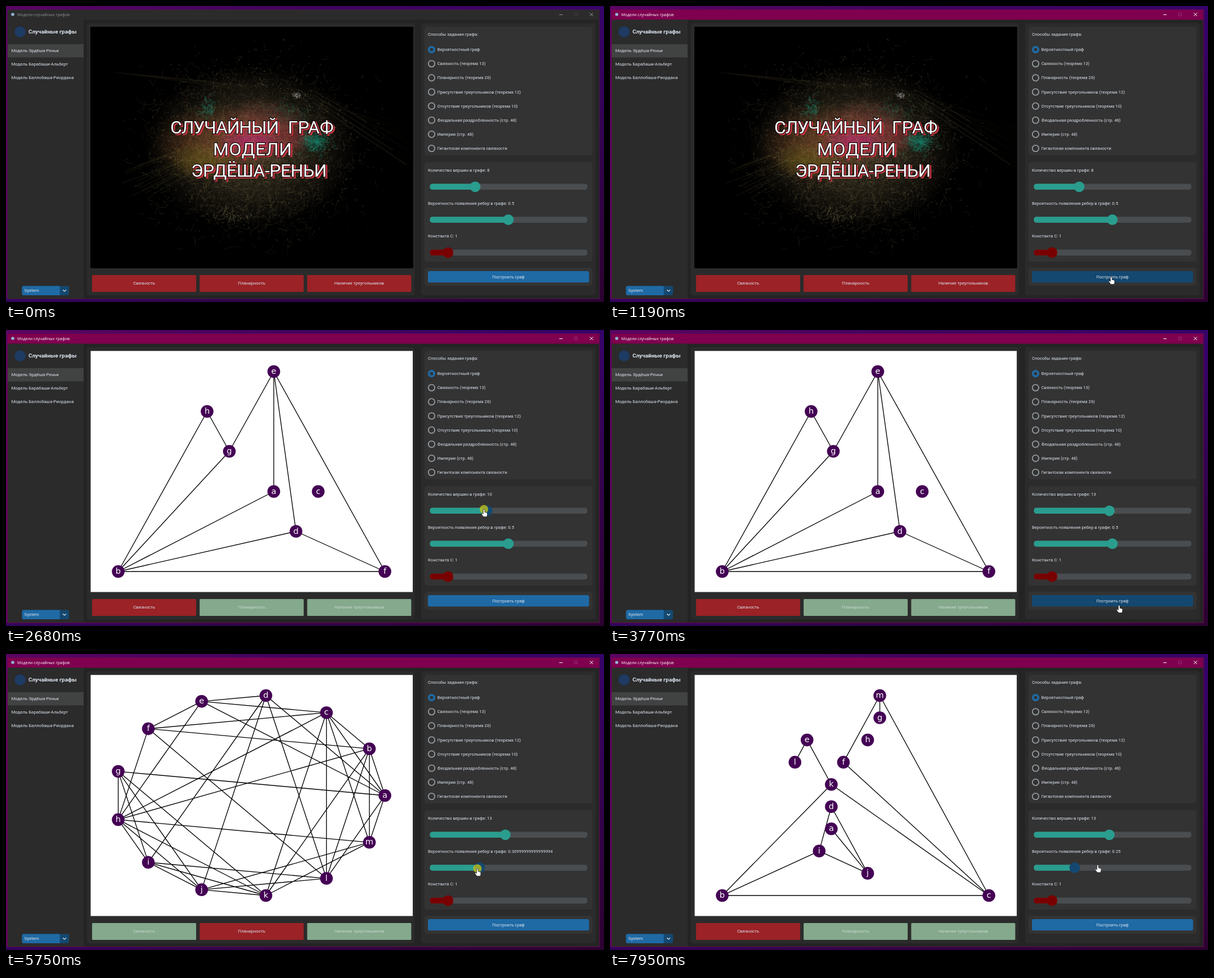
Recreate the animation shown at these times as an HTML page with a canvas. Size 1063 by 527 pixels, loop 8000 ms.

```html
<!DOCTYPE html>
<html lang="ru">
<head>
<meta charset="utf-8">
<title>Модели случайных графов</title>
<style>
html, body { margin: 0; width: 100%; height: 100%; overflow: hidden; background: #2c0552; }
svg, canvas { position: absolute; left: 0; top: 0; display: block; }
#cover { left: 150px; top: 37px; }
text { font: 7.65px Roboto, sans-serif; fill: #dce4ee; white-space: pre; }
.mid { text-anchor: middle; }
.big { font-size: 7.85px; }
.head { font-size: 9.9px; font-weight: 700; }
.cap { font: 7.1px "Open Sans", sans-serif; }
.node { font: 14.6px "DejaVu Sans", sans-serif; fill: #fff; text-anchor: middle; }
.deco text { font: 400 32px Roboto, sans-serif; fill: inherit; }
</style>
</head>
<body>
<svg id="ui" width="1063" height="527"></svg>
<canvas id="cover" width="574" height="430"></canvas>
<svg id="top" width="1063" height="527"></svg>
<script>
const LOOP = 8000;
const $ = id => document.getElementById(id);
const BLUE = '#1f6aa5', HOVER = '#144870', TEAL = '#2a9d8f', RED = '#9b2226', GREEN = '#84a98c';

// ---------- static interface ----------
const rect = (x, y, x2, y2, fill, r = 0, more = '') =>
  `<rect x="${x}" y="${y}" width="${x2 - x}" height="${y2 - y}" rx="${r}" fill="${fill}" ${more}/>`;
const text = (x, y, str, cls = '', more = '') => `<text x="${x}" y="${y}" class="${cls}" ${more}>${str}</text>`;
const circle = (x, y, r, fill, more = '') => `<circle cx="${x}" cy="${y}" r="${r}" fill="${fill}" ${more}/>`;

const slider = (id, y, fill, x) =>
  rect(753.5, y - 5.3, 1033.5, y + 5.3, '#4a4d50', 4.5) +
  rect(753.5, y - 5.3, x, y + 5.3, fill, 4.5, `id="${id}Bar"`) +
  circle(x, y, 9.4, fill, `id="${id}Knob"`);

const modes = ['Вероятностный граф', 'Связность (теорема 13)', 'Планарность (теорема 26)',
  'Присутствие треугольников (теорема 12)', 'Отсутствие треугольников (теорема 10)',
  'Феодальная раздробленность (стр. 48)', 'Империя (стр. 48)', 'Гигантская компонента связности'];
const models = ['Модель Эрдёша-Реньи', 'Модель Барабаши-Альберт', 'Модель Баллобаша-Риордана'];
const checks = ['Связность', 'Планарность', 'Наличие треугольников'];

$('ui').innerHTML = `
  <defs>
    <linearGradient id="desk"><stop stop-color="#5a0464"/><stop offset=".5" stop-color="#40045e"/>
      <stop offset="1" stop-color="#36046a"/></linearGradient>
    <linearGradient id="floor"><stop stop-color="#32055c"/><stop offset="1" stop-color="#2c0230"/></linearGradient>
    <linearGradient id="side" x2="0" y2="1"><stop stop-color="#36046a"/><stop offset="1" stop-color="#2c0230"/></linearGradient>
  </defs>` +
  rect(0, 0, 1063, 527, 'url(#desk)') +
  rect(1055, 0, 1063, 527, 'url(#side)') +
  rect(0, 521, 1063, 527, 'url(#floor)') +
  rect(2.5, 6.5, 1055, 521.5, '#242424', 0, 'id="frame" stroke="#4a1450"') +
  rect(3, 7, 1054.5, 24.5, '#2b2b2b', 0, 'id="bar"') +
  circle(12, 15, 2.8, '#8fb4cf') +
  text(20, 17.8, 'Модели случайных графов', 'cap', 'id="caption"') +
  '<path id="ctl" d="M983.5 15.5h6M1037.8 12.2l5.8 5.8m0-5.8l-5.8 5.8" fill="none" stroke="#999"/>' +
  '<path id="max" d="M1010.5 12.5h5v5h-5z" fill="none" stroke="#444" stroke-width=".8"/>' +
  rect(3, 24.5, 138, 521, '#2b2b2b') +
  circle(25, 46, 9.8, '#1d3b63') +
  text(40, 49.3, 'Случайные графы', 'head') +
  rect(3, 68, 138, 91.5, '#414242') +
  models.map((m, i) => text(9.5, 82 + 24 * i, m, 'big')).join('') +
  rect(28.5, 498.5, 112, 515, HOVER, 3) +
  '<path d="M31.5 498.5H95.5V515H31.5a3 3 0 0 1-3-3v-10.5a3 3 0 0 1 3-3z" fill="#1f6aa5"/>' +
  text(32.5, 509.4, 'System', 'big') +
  '<path d="M101.5 505.8l2.5 2.2 2.5-2.2" fill="none" stroke="#dce4ee" stroke-width="1.3" stroke-linecap="round"/>' +
  rect(144, 30.5, 726.5, 515, '#2b2b2b', 5) +
  checks.map((c, i) => {
    const x = 153 + 191.2 * i;
    return rect(x, 479, x + 185, 509, RED, 1.5, `id="check${i}"`) +
      text(x + 92.5, 496.3, c, 'mid big', `id="checkText${i}"`);
  }).join('') +
  rect(738, 30.5, 1048.5, 515, '#2b2b2b', 5) +
  rect(744, 37, 1042.5, 266, '#333', 5) +
  rect(744, 278, 1042.5, 455, '#333', 5) +
  rect(744, 466, 1042.5, 498, '#333', 5) +
  text(750, 53.2, 'Способы задания графа:') +
  modes.map((m, i) => {
    const y = 77.6 + 25.13 * i;
    return circle(756.5, y, i ? 5.7 : 4.8, 'none', `stroke="${i ? '#949a9f' : BLUE}" stroke-width="${i ? 1.8 : 3.7}"`) +
      text(766.8, y + 2.6, m);
  }).join('') +
  text(750, 295, '', '', 'id="countText"') + slider('count', 321.8, TEAL, 834) +
  text(750, 353.6, '', '', 'id="probText"') + slider('prob', 380.5, TEAL, 893) +
  text(750, 412.2, 'Константа С: 1') + slider('konst', 439, '#780000', 785.8) +
  rect(750, 472, 1036.5, 492.3, BLUE, 3, 'id="build"') +
  text(893.2, 484.8, 'Построить граф', 'mid');

// ---------- graphs ----------
const letters = [...'abcdefghijklm'];
const ring = Object.fromEntries(letters.map((c, i) => {
  const a = 2 * Math.PI * i / 13;
  return [c, [433 + 240.5 * Math.cos(a), 252 - 179.3 * Math.sin(a)]];
}));
const first = { e: [476, 74], h: [357.5, 145], g: [397, 216], a: [476, 287.5], c: [555, 287.5],
  d: [515.5, 358.5], b: [199.5, 430], f: [673.5, 430] };
// column and row of each vertex
const cells = { m: [13, 0], g: [13, 1], e: [7, 2], h: [12, 2], l: [6, 3], f: [10, 3], k: [9, 4],
  d: [9, 5], a: [9, 6], i: [8, 7], j: [12, 8], b: [0, 9], c: [22, 9] };
const last = Object.fromEntries(Object.entries(cells).map(([c, [col, row]]) =>
  [c, [199.5 + 21.545 * col, 74 + 39.55 * row]]));

function graph(id, pos, edges) {
  const lines = edges.split(' ').map(([p, q]) => `M${pos[p]}L${pos[q]}`).join('');
  const nodes = Object.entries(pos).map(([c, [x, y]]) =>
    circle(x, y, 11.3, '#440154') + text(x, y + 4, c, 'node')).join('');
  return `<g id="${id}">${rect(150.5, 37.3, 723, 466.5, '#fff')}
    <path d="${lines}" stroke="#000" stroke-width="1.35" fill="none"/>${nodes}</g>`;
}

const words = text(292, 227, 'СЛУЧАЙНЫЙ', '', 'letter-spacing="-1.2"') + text(501, 227, 'ГРАФ') +
  text(368, 265.5, 'МОДЕЛИ', '', 'letter-spacing=".6"') + text(329, 303.5, 'ЭРДЁША-РЕНЬИ', '', 'letter-spacing="-.5"');

$('top').innerHTML =
  `<g id="words" class="deco">
    <g transform="translate(2.6 2.4)" fill="#c8343f" stroke="#c8343f" stroke-width="2">${words}</g>
    <g fill="#fff" stroke="#140808" stroke-width="2.4" paint-order="stroke">${words}</g></g>` +
  graph('g1', first, 'hb hg ge gb ae ab ed ef db df bf') +
  graph('g2', ring, 'ed ef ec eh ea di dj da dl fc fb fh fl cb ch ca cm cl ck ba bm bl bk bh ' +
    'ag am al gh gi gj gk hm hi hj hk il ik ij jk jl jm km') +
  graph('g3', last, 'mg mf mc fc el ek kb kc di dj aj ij ib bc') +
  circle(0, 0, 7.6, '#c3c41c', 'id="press" opacity=".78"') +
  `<g id="mouse" fill="#fff" stroke="#111" stroke-width=".7" stroke-linejoin="round">
    <path id="hand" d="M-1.4 1Q0-1 1.4 1V5.2L4.6 6Q6.4 6.4 6.2 8.4L5.4 13.5H-.8L-4.4 8.8Q-4.6 6.9-3 7.3L-1.4 8.5Z"/>
    <path id="arrow" d="M0 0V11L2.6 8.6 4.4 12.5 6 11.8 4.3 8H7.8Z"/></g>`;

// ---------- cover picture ----------
(function paintCover() {
  const c = $('cover').getContext('2d');
  let seed = 11;
  const rnd = () => {
    seed = seed + 0x6D2B79F5 | 0;
    let v = Math.imul(seed ^ seed >>> 15, 1 | seed);
    v ^= v + Math.imul(v ^ v >>> 7, 61 | v);
    return ((v ^ v >>> 14) >>> 0) / 4294967296;
  };
  const spread = () => rnd() + rnd() + rnd() - 1.5;
  c.fillStyle = '#000';
  c.fillRect(0, 0, 574, 430);
  c.translate(-150, -37);

  function glow(x, y, rx, ry, rgb, a) {
    c.save();
    c.translate(x, y);
    c.scale(rx, ry);
    const g = c.createRadialGradient(0, 0, 0, 0, 0, 1);
    g.addColorStop(0, `rgba(${rgb},${a})`);
    g.addColorStop(.5, `rgba(${rgb},${a * .6})`);
    g.addColorStop(1, `rgba(${rgb},0)`);
    c.fillStyle = g;
    c.fillRect(-1, -1, 2, 2);
    c.restore();
  }
  function line(x, y, x2, y2, bend, rgb, a, w = .5) {
    c.strokeStyle = `rgba(${rgb},${a})`;
    c.lineWidth = w;
    c.beginPath();
    c.moveTo(x, y);
    c.quadraticCurveTo((x + x2) / 2 + (y - y2) * bend, (y + y2) / 2 + (x2 - x) * bend, x2, y2);
    c.stroke();
  }
  function strands(n, cx, cy, rx, ry, len, rgb, a) {
    for (let i = 0; i < n; i++) {
      const x = cx + spread() * rx, y = cy + spread() * ry;
      const d = Math.atan2(y - cy, x - cx) + 1.57 + spread() * 2;
      const l = len * (.3 + rnd());
      line(x, y, x + Math.cos(d) * l, y + Math.sin(d) * l, spread() * .5, rgb, a * (.4 + rnd()));
    }
  }
  const khaki = '150,140,98';
  glow(435, 250, 190, 145, '105,92,62', .5);
  glow(375, 245, 115, 72, '140,75,38', .45);
  glow(455, 222, 85, 58, '165,70,68', .5);
  glow(350, 275, 60, 32, '110,105,20', .4);
  glow(435, 242, 58, 28, '190,25,115', .65);
  glow(505, 232, 42, 36, '165,42,56', .4);
  glow(550, 240, 26, 20, '15,130,105', .5);

  // long beams
  for (let i = 0; i < 14; i++) {
    line(186 + i * 6, 117 + i * .6, 400 + i * 5, 146 + spread() * 7, 0, '110,104,62', .13);
    line(345, 240 + i * 3.5, 205 + rnd() * 50, 284 + i * 4.5, 0, '115,102,55', .22, .9);
    line(520 + rnd() * 60, 155 + rnd() * 20, 724, 215 + i * 6, 0, '105,98,62', .13, .6);
  }
  for (let i = 0; i < 4; i++) line(545, 150 + i * 7, 640 + i * 24, 205 + i * 26, 0, khaki, .3, .7);

  strands(2400, 437, 252, 165, 125, 13, khaki, .3);
  strands(800, 430, 285, 135, 110, 26, '165,145,98', .17);
  strands(450, 370, 245, 95, 62, 16, '200,112,58', .22);
  strands(350, 455, 225, 85, 62, 16, '205,105,98', .22);
  strands(140, 438, 242, 60, 30, 14, '215,45,145', .35);
  strands(120, 352, 275, 60, 32, 14, '145,138,40', .3);
  strands(150, 550, 241, 26, 24, 11, '25,155,128', .7);
  strands(70, 360, 181, 14, 20, 9, '25,145,118', .75);
  strands(80, 500, 188, 40, 20, 10, '22,125,105', .5);
  strands(60, 398, 372, 34, 12, 12, khaki, .6);
  strands(40, 517, 159, 8, 5, 4, '200,200,200', .8);

  // loose flecks around the core
  for (let i = 0; i < 750; i++) {
    const a = rnd() * 6.283, r = .7 + rnd() * rnd() * .7;
    const x = 440 + Math.cos(a) * 182 * r, y = 248 + Math.sin(a) * 152 * r;
    const d = rnd() * 6.283, l = 1 + rnd() * 3.5;
    line(x, y, x + Math.cos(d) * l, y + Math.sin(d) * l, spread() * .8, khaki, .2 + rnd() * .4, .7);
  }
})();

// ---------- motion ----------
const path = [[130, 942, 548], [480, 906, 359], [910, 891, 482], [1890, 891, 482], [2320, 834, 318],
  [2580, 834, 319], [2860, 888, 319], [3110, 888, 319], [3590, 905, 490], [3770, 905, 490],
  [4080, 899, 482], [4980, 899, 482], [5400, 893, 381], [5470, 893, 382], [5880, 822, 382],
  [6410, 822, 382], [6780, 883, 480], [7420, 883, 480], [7950, 867, 375.5]];
const presses = [[960, 1080], [2470, 2860], [3840, 3960], [5440, 5950], [6800, 6890]];
const flashes = [[1080, 1180], [3960, 4080], [6890, 6970]];

const within = (list, t) => list.some(([a, b]) => t >= a && t < b);

function mouseAt(t) {
  const i = path.findIndex(p => p[0] > t);
  if (i < 0) return path[path.length - 1].slice(1);
  if (!i) return path[0].slice(1);
  const [t0, x0, y0] = path[i - 1], [t1, x1, y1] = path[i];
  const s = (1 - Math.cos(Math.PI * (t - t0) / (t1 - t0))) / 2;
  return [x0 + (x1 - x0) * s, y0 + (y1 - y0) * s];
}
const share = t => (mouseAt(t)[0] - 750) / 287;
const set = (id, attrs) => { for (const k in attrs) $(id).setAttribute(k, attrs[k]); };
const show = (id, on) => { $(id).style.display = on ? '' : 'none'; };

function moveSlider(id, part, hot) {
  const x = 759 + 268 * part;
  set(id + 'Bar', { width: x - 753.5 });
  set(id + 'Knob', { cx: x, fill: hot ? HOVER : TEAL });
}

function draw(t) {
  const [x, y] = mouseAt(t);
  const inside = (top, bottom) => x >= 750 && x <= 1037 && y >= top && y <= bottom;
  const onCount = inside(313, 331), onProb = inside(371, 390), onBuild = inside(472, 492);

  const active = t >= 960;
  set('frame', { stroke: active ? '#6a0650' : '#4a1450' });
  set('bar', { fill: active ? '#7f004f' : '#2b2b2b' });
  set('ctl', { stroke: active ? '#fff' : '#999' });
  set('max', { stroke: active ? '#a03a7a' : '#444' });
  $('caption').style.fill = active ? '#fff' : '#8f8f8f';

  const count = t < 2470 ? 8 : 1 + Math.round(share(Math.min(t, 2860)) * 25);
  const prob = t < 5440 ? .5 : 1 - Math.round((1 - share(Math.min(t, 5950))) / .01) * .01;
  $('countText').textContent = 'Количество вершин в графе: ' + count;
  $('probText').textContent = 'Вероятность появления ребер в графе: ' + prob;
  moveSlider('count', (count - 1) / 25, onCount);
  moveSlider('prob', prob, onProb);
  set('build', { fill: onBuild && !within(flashes, t) ? HOVER : BLUE });

  const failed = t < 1610 ? [0, 1, 2] : t >= 4320 && t < 7250 ? [1] : [0];
  checks.forEach((_, i) => {
    const bad = failed.includes(i);
    set('check' + i, { fill: bad ? RED : GREEN });
    $('checkText' + i).style.fill = bad ? '#dce4ee' : '#c9d8d0';
  });

  const scene = t < 1660 ? 0 : t < 4420 ? 1 : t < 7300 ? 2 : 3;
  show('cover', scene === 0);
  show('words', scene === 0);
  for (let i = 1; i < 4; i++) show('g' + i, scene === i);

  const hand = onCount || onProb || onBuild || inside(430, 448);
  show('hand', hand);
  show('arrow', !hand);
  show('press', within(presses, t));
  set('press', { cx: x, cy: y });
  set('mouse', { transform: `translate(${x} ${y})` });
}

function tick() {
  draw(performance.now() % LOOP);
  requestAnimationFrame(tick);
}
tick();
</script>
</body>
</html>
```
